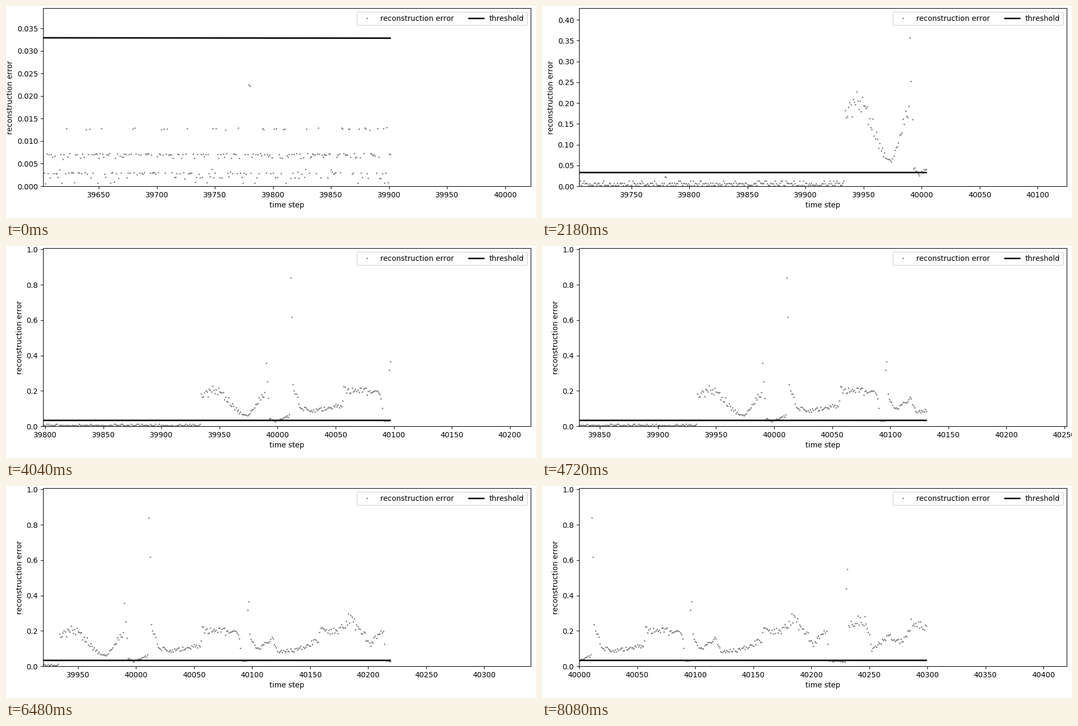
These frames come from a looping animation (1000x400 px, 8120 ms). A matplotlib script:

```python
import numpy as np
import matplotlib.pyplot as plt
from matplotlib.animation import FuncAnimation

FRAMES, INTERVAL, HOLD = 406, 20, 9
WINDOW, AHEAD = 300, 120
FIRST, FIRST_END, LAST = 39602, 39901, 40299
ONSET = 39934

# Share of quiet steps at each error level.
LEVEL_SHARES = {0.0071: 0.39, 0.0029: 0.28, 0.0128: 0.10, 0.0019: 0.10,
                0.0064: 0.08, 0.0007: 0.03, 0.0038: 0.02}

# Turning points of the anomalous course: (step, error).
COURSE = [
    (39934, 0.180), (39949, 0.198), (39958, 0.145), (39965, 0.085),
    (39974, 0.062), (39989, 0.195), (39992, 0.180), (39993, 0.045),
    (39998, 0.027), (40010, 0.060), (40013, 0.218), (40020, 0.105),
    (40030, 0.090), (40055, 0.115), (40057, 0.200), (40083, 0.195),
    (40089, 0.165), (40091, 0.036), (40095, 0.030), (40098, 0.170),
    (40104, 0.095), (40118, 0.155), (40122, 0.080), (40136, 0.090),
    (40157, 0.145), (40158, 0.210), (40174, 0.190), (40184, 0.275),
    (40202, 0.128), (40213, 0.207), (40215, 0.032), (40229, 0.025),
    (40232, 0.250), (40247, 0.260), (40252, 0.095), (40266, 0.165),
    (40279, 0.140), (40286, 0.240), (40299, 0.225)]

# Two-step surges: (step, error, next error).
SURGES = [(39779, 0.0226, 0.0222), (39944, 0.227, 0.205),
          (39990, 0.357, 0.252), (40011, 0.839, 0.617),
          (40096, 0.317, 0.365), (40230, 0.437, 0.548)]

plt.rcParams["text.kerning_factor"] = 6
rng = np.random.default_rng(4)
steps = np.arange(FIRST, LAST + 1)

quiet = rng.choice(list(LEVEL_SHARES), steps.size, p=list(LEVEL_SHARES.values()))
quiet += rng.normal(0, 0.00012, steps.size)
course = np.interp(steps, *zip(*COURSE)) * rng.uniform(0.88, 1.12, steps.size)
errors = np.where(steps < ONSET, quiet, course)
for step, *peaks in SURGES:
    errors[step - FIRST:step - FIRST + 2] = peaks
threshold = np.interp(steps, [FIRST, FIRST_END, LAST], [0.03294, 0.03286, 0.0331])

fig, ax = plt.subplots(figsize=(10, 4), dpi=100)
fig.subplots_adjust(left=0.07, right=0.99, bottom=0.15, top=0.99)
dots, = ax.plot([], [], ".", color="gray", markersize=2,
                label="reconstruction error")
line, = ax.plot([], [], color="black", linewidth=2, label="threshold")
ax.set_xlabel("time step")
ax.set_ylabel("reconstruction error")
ax.legend(loc="upper right", ncol=2)
line.set_snap(False)


def update(frame):
    # The view rests first, then advances one step per frame.
    end = FIRST_END if frame < HOLD else min(FIRST_END - 6 + frame, LAST)
    left = end - WINDOW + 1
    view = slice(left - FIRST, end - FIRST + 1)
    dots.set_data(steps[view], errors[view])
    line.set_data(steps[view], threshold[view])
    ax.set_xlim(left, left + WINDOW + AHEAD)
    ax.set_ylim(0, 1.2 * max(errors[view].max(), threshold[view].max()))
    return dots, line


anim = FuncAnimation(fig, update, frames=FRAMES, interval=INTERVAL,
                     init_func=lambda: update(0), repeat=True, repeat_delay=0)
plt.show()
```
